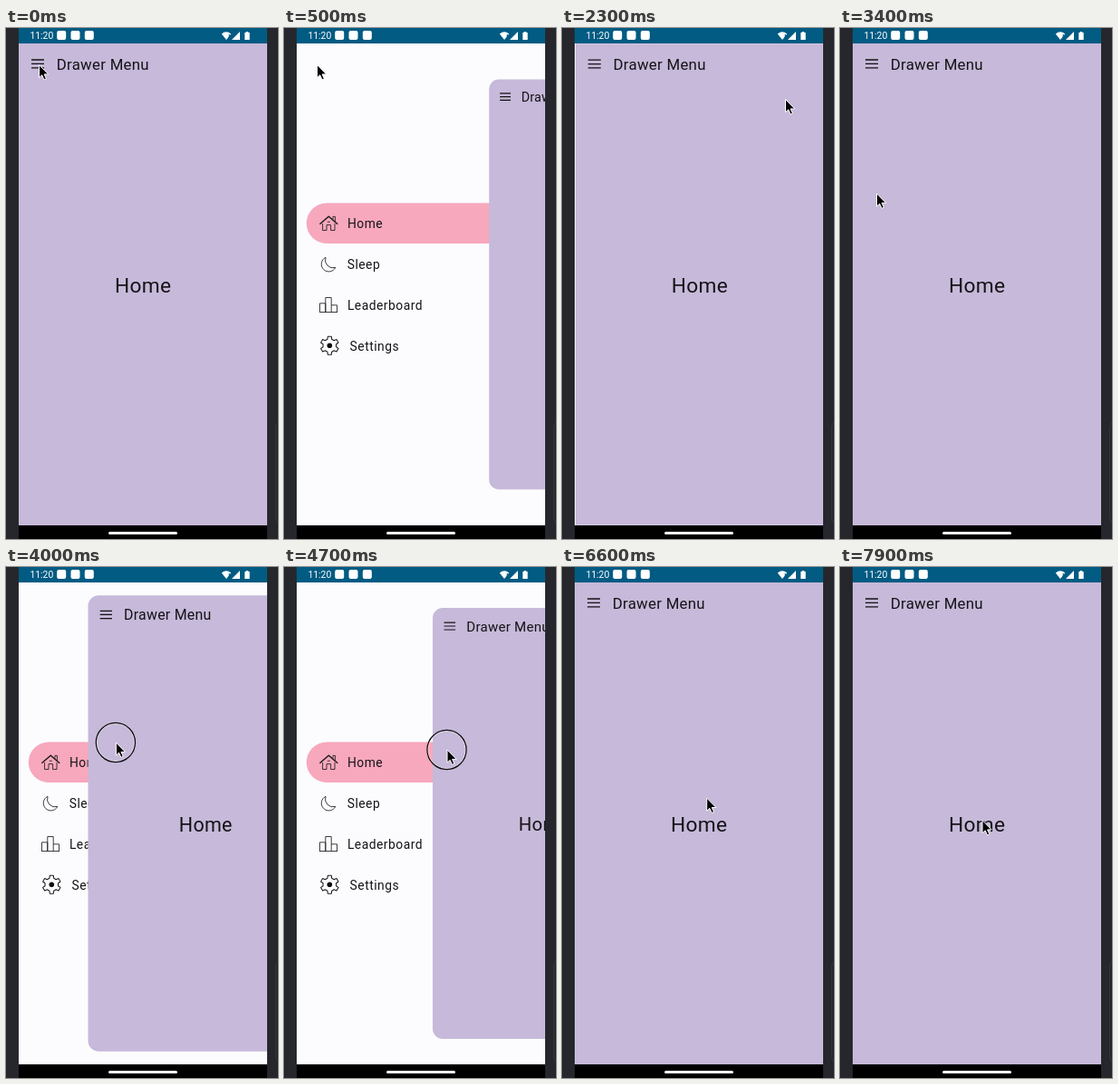
An HTML page that plays this animation: 300 px wide and 562 px high, repeating every 8 s.

```html
<!DOCTYPE html>
<html lang="en">
<head>
<meta charset="utf-8">
<title>Drawer Menu</title>
<style>
  html, body { margin: 0; width: 100%; height: 100%; overflow: hidden; background: #25272c; }
  svg { display: block; width: 100vw; height: 100vh; }
  text { font-family: Roboto, "Open Sans", sans-serif; fill: #151317; }
  .title { font-size: 16.8px; letter-spacing: .3px; }
  .page { font-size: 22.7px; letter-spacing: .3px; text-anchor: middle; }
  .item { font-size: 13.8px; letter-spacing: .52px; }
  .clock { font-size: 10.4px; fill: #fff; }
  .icon { fill: none; stroke: #1c1c1c; stroke-width: .85; stroke-linejoin: round; }
</style>
</head>
<body>
<svg viewBox="0 0 300 562" preserveAspectRatio="none">
  <defs>
    <clipPath id="screen"><rect x="14" y="17" width="274" height="530"/></clipPath>
  </defs>
  <rect width="300" height="562" fill="#25272c"/>
  <path d="M300 434Q297.5 436 297.5 440V538Q297.5 542 300 544" fill="none" stroke="#34363b"/>
  <rect x="14" y="17" width="274" height="530" fill="#fcfcff"/>

  <!-- Menu -->
  <path d="M270 192.5H47a22.25 22.25 0 0 0 0 44.5H270Z" fill="#f7a8bd"/>
  <g class="icon">
    <path d="M39.4 215.8L49.3 207.2L59.2 215.8" stroke-width="1.5"/>
    <path d="M54 210.6V207.4H56.4V212.8M42.6 215V222.5H47V216.6H51.6V222.5H56V215M47.8 213.2H50.8"/>
    <path d="M46 252.3A8.2 8.2 0 1 0 56.8 263.4A8.6 8.6 0 0 1 46 252.3Z"/>
    <path d="M39.5 312.5V302.8H45.8V312.5M45.8 312.5V296.5H52.2V312.5M52.2 304.8H58.5V312.5M39 312.5H59"/>
    <path id="gear" stroke-width="1.05"/>
  </g>
  <circle cx="50.3" cy="349.2" r="2.8" fill="#0b0b0b"/>
  <g class="item">
    <text x="69.9" y="220.4">Home</text>
    <text x="69.7" y="265.2">Sleep</text>
    <text x="69.9" y="310">Leaderboard</text>
    <text x="72.6" y="354.7">Settings</text>
  </g>

  <!-- Page -->
  <g clip-path="url(#screen)">
    <g id="page">
      <rect id="sheet" width="274" height="530" fill="#c6b9d9"/>
      <path d="M14 18H28M14 22.4H28M14 26.8H28" stroke="#141216" stroke-width="1.3"/>
      <text class="title" x="41.7" y="28.7">Drawer Menu</text>
      <text class="page" x="137.2" y="274">Home</text>
    </g>
  </g>

  <!-- System bars -->
  <rect x="14" width="274" height="17" fill="#015b83"/>
  <text class="clock" x="26.4" y="12.2">11:20</text>
  <g fill="#fff">
    <rect x="56.2" y="3" width="10" height="10" rx="2"/>
    <rect x="71.5" y="3" width="10" height="10" rx="2"/>
    <rect x="86.8" y="3" width="10" height="10" rx="2"/>
    <path d="M243 13L237.8 6.4Q243 2.2 248.2 6.4Z"/>
    <path d="M249 13H258V4Z"/>
    <path d="M263.3 5H264.8V4H267.2V5H268.7V13H263.3Z"/>
  </g>
  <path d="M246.3 7V10.4M246.3 11.4V12.8" stroke="#015b83" stroke-width="1.1"/>
  <rect x="14" y="547" width="274" height="15" fill="#000"/>
  <rect x="113" y="554" width="76" height="3" rx="1.5" fill="#f4f4f4"/>

  <!-- Pointer -->
  <g id="pointer">
    <g id="touch" fill="none">
      <circle r="20.6" stroke="#fff" stroke-opacity=".55"/>
      <circle r="21.6" stroke="#0a0a0a" stroke-width="1.2"/>
    </g>
    <path d="M.5 0V14.2L3.7 11.3L6 16.4L8.4 15.3L6.1 10.4H10.7Z" fill="#000" stroke="#fff" stroke-linejoin="round"/>
  </g>
</svg>
<script>
const LOOP = 8000, STEP = 100;
const OPEN = 213, MIN_SCALE = .85;
const $ = id => document.getElementById(id);

const mix = (a, b, k) => a + (b - a) * k;
const easeOut = k => 1 - (1 - k) ** 2;

// Critically damped spring, progress after ms
function spring(ms) {
  const w = Math.sqrt(1500) * ms / 1000;
  return 1 - (1 + w) * Math.exp(-w);
}

// Each move starts where the one before it ended; a slide without an end springs
const slides = [
  { from: 300, to: OPEN },
  { from: 2100, to: 0 },
  { from: 3700, end: 4700, to: 150 },
  { from: 4900, to: OPEN },
  { from: 5400, end: 5900, to: 152 },
  { from: 5900, to: 0 }
];

const home = { x: 36, y: 40.5 };
const moves = [
  { from: 700, end: 1500, x: 246, y: 78.5 },
  { from: 2500, end: 3400, x: 40, y: 182 },
  { from: 3620, end: 4700, x: 179.5, y: 201 },
  { from: 4700, end: 5100, x: 224, y: 210 },
  { from: 5400, end: 5900, x: 160.5, y: 242 },
  { from: 6400, end: 7500, x: 156.5, y: 278.5 }
];

const presses = [[200, 300], [1900, 2100], [3600, 4900], [5400, 5900]];

function progress(step, t) {
  const ms = t - step.from;
  if (ms <= 0) return 0;
  return step.end ? easeOut(Math.min(1, ms / (step.end - step.from))) : spring(ms);
}

function offsetAt(t) {
  const i = slides.findLastIndex(s => t >= s.from);
  if (i < 0) return 0;
  return mix(i ? slides[i - 1].to : 0, slides[i].to, progress(slides[i], t));
}

function pointerAt(t) {
  return moves.reduce((pos, m) => {
    const k = progress(m, t);
    return { x: mix(pos.x, m.x, k), y: mix(pos.y, m.y, k) };
  }, home);
}

function gearPath(cx, cy, teeth) {
  const shape = [[-.32, 7.4], [-.2, 10.2], [.2, 10.2], [.32, 7.4]];
  const points = [];
  for (let i = 0; i < teeth; i++) {
    for (const [turn, r] of shape) {
      const a = (i / teeth) * 2 * Math.PI + Math.PI / 6 + turn;
      points.push((cx + r * Math.cos(a)).toFixed(2) + " " + (cy + r * Math.sin(a)).toFixed(2));
    }
  }
  return "M" + points.join("L") + "Z";
}

function draw(t) {
  const offset = offsetAt(t), open = offset / OPEN;
  const scale = mix(1, MIN_SCALE, open);
  $("page").setAttribute("transform", `translate(${14 + offset} ${282 - 265 * scale}) scale(${scale})`);
  $("sheet").setAttribute("rx", 12.5 * Math.min(1, open * 4));

  const { x, y } = pointerAt(t);
  $("pointer").setAttribute("transform", `translate(${x} ${y})`);
  const down = presses.some(([from, to]) => t >= from && t < to);
  $("touch").setAttribute("visibility", down ? "visible" : "hidden");
}

$("gear").setAttribute("d", gearPath(50.3, 349.2, 6));

const start = performance.now();
function tick() {
  const t = (performance.now() - start) % LOOP;
  draw(Math.floor(t / STEP) * STEP);
  requestAnimationFrame(tick);
}
tick();
</script>
</body>
</html>
```
